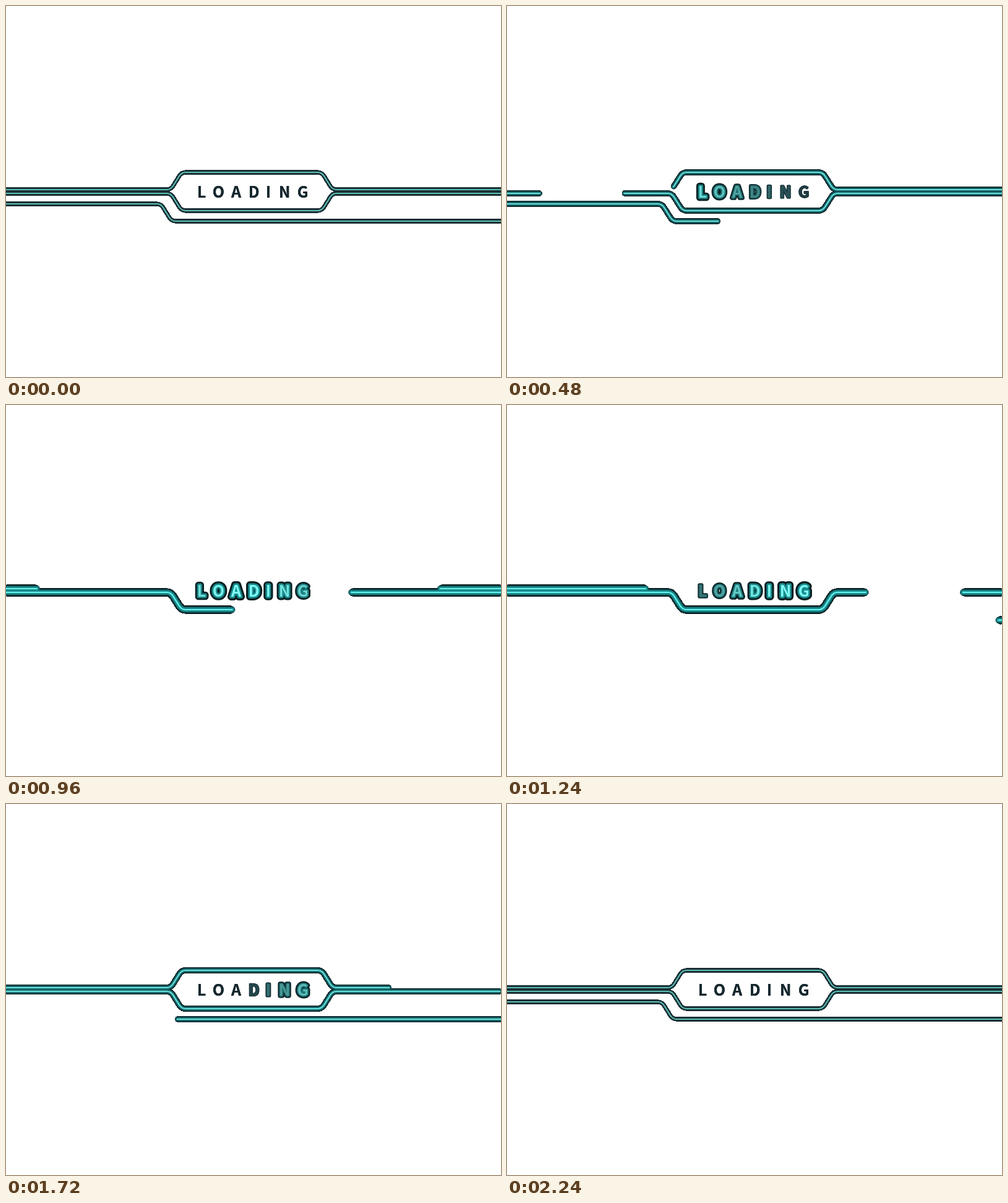
Write an HTML page that moves like this. It is 800 px wide and 600 px high and loops after 2.4 s.

```html
<!DOCTYPE html>
<html lang="en">
<head>
<meta charset="utf-8">
<title>Loading</title>
<style>
  html, body { margin: 0; width: 100%; height: 100%; overflow: hidden; background: #fff; }
  svg { display: block; width: 800px; height: 600px; }
  path { fill: none; stroke-linecap: round; stroke-linejoin: round; }
  .hard { shape-rendering: crispEdges; }
  text { font: 700 25px "Noto Sans CJK SC", "Noto Sans CJK JP", "Noto Sans", sans-serif; stroke-linejoin: round; }
</style>
</head>
<body>
<svg id="stage" viewBox="0 0 800 600"></svg>
<script>
const LOOP = 2400, LAST = 2240, STEP = 40;
const stage = document.getElementById('stage');

function add(tag, attrs, content = '') {
  const node = document.createElementNS('http://www.w3.org/2000/svg', tag);
  set(node, attrs);
  node.textContent = content;
  return stage.appendChild(node);
}
function set(node, attrs) {
  for (const key in attrs) node.setAttribute(key, attrs[key]);
}
const clamp = v => Math.min(1, Math.max(0, v));
const mix = (a, b, k) => `rgb(${a.map((v, i) => Math.round(v + (b[i] - v) * k))})`;
const easeSine = (t, start, duration) => (1 - Math.cos(Math.PI * clamp((t - start) / duration))) / 2;

const SLATE = [27, 47, 54], SHADOW = [7, 29, 31], DEEP = [14, 78, 81];
const TEAL = [24, 142, 144], SEA = [92, 190, 178], CYAN = [106, 246, 240];

// A line that leaves the middle row, runs along the frame and comes back.
function frameLine(y, dir) {
  const at = d => y + dir * d;
  return `M0 ${y}H260Q266 ${y} 270 ${at(6)}L280 ${at(22)}Q284 ${at(28)} 290 ${at(28)}` +
    `H504Q510 ${at(28)} 514 ${at(22)}L524 ${at(6)}Q528 ${y} 534 ${y}H800`;
}

// out: how much of the old line is erased; into: how much of the new one is drawn.
const tracks = [
  { d: frameLine(297, -1),
    out: t => easeSine(t, 0, 1238),
    into: t => (-18 + 1046 * easeSine(t, 665, 1800)) / 826 },
  { d: frameLine(303, 1),
    out: t => easeSine(t, 0, 1510),
    into: t => easeSine(t, 228, 1547) },
  { d: 'M800 348H274Q268 348 264 342L254 326Q250 320 244 320H0',
    out: t => easeSine(t, 0, 897),
    into: t => easeSine(t, 1193, 900) }
];

const layers = [
  { from: SLATE, to: SHADOW, width: r => 2 * r },
  { from: SLATE, to: DEEP, width: r => 1.5 * r },
  { from: SLATE, to: TEAL, width: r => 1.05 * r },
  { from: SEA, to: CYAN, width: () => 2.2 }
];

layers.forEach((layer, depth) => {
  const look = depth ? '' : 'hard';
  layer.strokes = tracks.map(({ d }) => [add('path', { d, class: look }), add('path', { d, class: look })]);
});
for (const track of tracks) track.length = layers[0].strokes[0][0].getTotalLength();

// Later letters light up later and stay lit a little longer.
const originX = [308.7, 333.8, 364, 391.7, 419.7, 440.7, 470.8];
const letters = [...'LOADING'].map((char, i) => ({
  start: 65 * i,
  duration: 1460 + 60 * i,
  parts: [0, 1, 2].map(() => add('text', { x: originX[i], y: 310.3 }, char))
}));

function drawSpan(path, from, to, length, inset) {
  const a = from + inset, b = to - inset;
  const visible = to - from > 0.5 && b > a;
  path.style.display = visible ? '' : 'none';
  if (visible) set(path, { 'stroke-dasharray': `${b - a} ${length + 100}`, 'stroke-dashoffset': -a });
}

function drawLines(t) {
  const glow = Math.sin(Math.PI * t / LAST);
  const radius = 3.6 + 3.2 * glow * glow;
  layers.forEach((layer, depth) => {
    const style = { stroke: mix(layer.from, layer.to, glow), 'stroke-width': layer.width(radius) };
    const inset = depth ? 0 : Math.max(0, radius - 4);
    tracks.forEach(({ out, into, length }, i) => {
      const [oldLine, newLine] = layer.strokes[i];
      set(oldLine, style);
      set(newLine, style);
      drawSpan(oldLine, out(t) * length, length, length, inset);
      drawSpan(newLine, 0, clamp(into(t)) * length, length, inset);
    });
  });
}

function drawLetters(t) {
  for (const { start, duration, parts: [halo, rim, face] } of letters) {
    const level = Math.sin(Math.PI * clamp((t - start) / duration));
    const dark = mix(SLATE, SHADOW, level);
    set(halo, { fill: dark, stroke: dark, 'stroke-width': 12 * level });
    const edge = mix(SLATE, TEAL, level);
    set(rim, { fill: edge, stroke: edge, 'stroke-width': 5.5 * level });
    set(face, { fill: mix([22, 40, 46], [128, 255, 246], Math.pow(level, 1.3)) });
  }
}

function render(now) {
  const t = Math.min(LAST, Math.floor((now % LOOP) / STEP) * STEP);
  drawLines(t);
  drawLetters(t);
}

const begin = performance.now();
function tick() {
  render(performance.now() - begin);
  requestAnimationFrame(tick);
}
tick();
</script>
</body>
</html>
```
